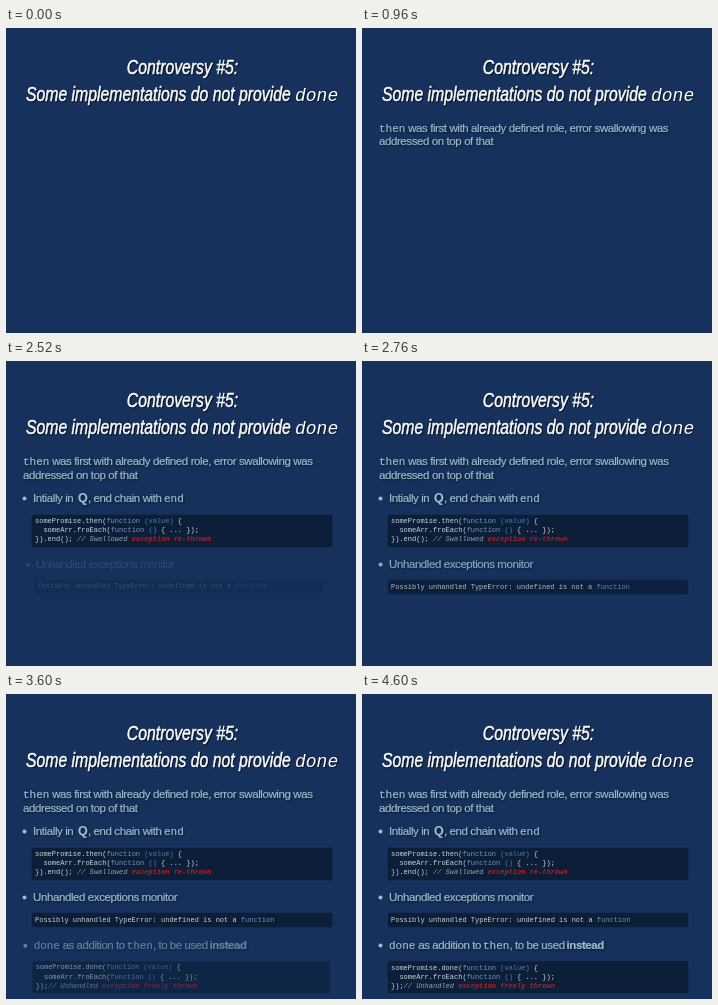
Animation, 350 px wide and 305 px high, one loop 4.64 s. Source, as an HTML page:

```html
<!DOCTYPE html>
<html lang="en">
<head>
<meta charset="utf-8">
<title>Controversy #5</title>
<style>
html, body { margin: 0; width: 100%; height: 100%; overflow: hidden; background: #15315c; }
svg { display: block; }
text { white-space: pre; }
.title { font: italic 20.5px "Liberation Sans", Arial, sans-serif; fill: #fff; stroke: #fff; stroke-width: .5px; filter: drop-shadow(1px 1.5px .7px #0009); }
.title .mono { font: italic 18px "Liberation Mono", monospace; stroke: none; }
.step { font: 11.5px "Liberation Sans", Arial, sans-serif; letter-spacing: -.4px; fill: #9fbbcc; }
.step > text { stroke: #9fbbcc; stroke-width: .2px; filter: drop-shadow(1px 1px 1px #0007); }
.mono { font: 11px "Liberation Mono", monospace; letter-spacing: 0; }
.q { font-size: 12.5px; font-weight: bold; }
.b { font-weight: bold; }
.box { fill: #0c1e38; stroke: #0c1e38; stroke-opacity: .5; }
.step .code { font: 7px "Liberation Mono", monospace; letter-spacing: 0; fill: #cbd6dc; stroke: none; }
.k { fill: #7197bb; }
.v { fill: #4a7fb8; }
.c { fill: #94a3b1; font-style: italic; }
.e { fill: #b5201f; font-weight: bold; font-style: italic; }
</style>
</head>
<body>
<svg width="350" height="305" viewBox="0 0 350 305">
  <g class="title">
    <text transform="translate(176.5 46) scale(.77 1)" text-anchor="middle">Controversy #5:</text>
    <text transform="translate(20 73) scale(.77 1)">Some implementations do not provide</text>
    <text class="mono" x="289" y="73">done</text>
  </g>

  <g class="step" data-begin="560" data-y="107">
    <text x="17" y="104"><tspan class="mono">then</tspan> was first with already defined role, error swallowing was</text>
    <text x="17" y="117.5">addressed on top of that</text>
  </g>

  <g class="step" data-begin="1480" data-y="160">
    <circle cx="18.5" cy="137.5" r="2"/>
    <text x="27" y="141">Intially in <tspan class="q" x="72">Q</tspan><tspan x="82">, end chain with </tspan><tspan class="mono" x="158">end</tspan></text>
    <rect class="box" x="26" y="154" width="300" height="32" rx="1.5"/>
    <g class="code">
      <text x="29" y="162">somePromise.then(<tspan class="k">function</tspan> <tspan class="v">(value)</tspan> {</text>
      <text x="29" y="171">  someArr.froEach(<tspan class="k">function</tspan> <tspan class="v">()</tspan> { ... });</text>
      <text x="29" y="180">}).end(); <tspan class="c">// Swallowed </tspan><tspan class="e">exception re-thrown</tspan></text>
    </g>
  </g>

  <g class="step" data-begin="2480" data-y="215">
    <circle cx="18.5" cy="203.5" r="2"/>
    <text x="27" y="207">Unhandled exceptions monitor</text>
    <rect class="box" x="26" y="219" width="300" height="14" rx="1.5"/>
    <text class="code" x="29" y="228">Possibly unhandled TypeError: undefined is not a <tspan class="k">function</tspan></text>
  </g>

  <g class="step" data-begin="3440" data-y="272">
    <circle cx="18.5" cy="251.5" r="2"/>
    <text x="27" y="255"><tspan class="mono">done</tspan> as addition to <tspan class="mono" x="121">then</tspan>, to be used <tspan class="b" x="204.5">instead</tspan></text>
    <rect class="box" x="26" y="267.5" width="300" height="31.5" rx="1.5"/>
    <g class="code">
      <text x="29" y="275.5">somePromise.done(<tspan class="k">function</tspan> <tspan class="v">(value)</tspan> {</text>
      <text x="29" y="284.7">  someArr.froEach(<tspan class="k">function</tspan> <tspan class="v">()</tspan> { ... });</text>
      <text x="29" y="294">});<tspan class="c">// Unhandled </tspan><tspan class="e">exception freely thrown</tspan></text>
    </g>
  </g>
</svg>
<script>
const LOOP = 4640, TICK = 40, FADE = 450, PIVOT_X = 100;
const steps = [...document.querySelectorAll('.step')];
const start = performance.now();
const easeOut = (p, power) => 1 - (1 - p) ** power;

function draw() {
  const elapsed = Math.max(0, performance.now() - start) % LOOP;
  const time = Math.floor(elapsed / TICK) * TICK;
  for (const step of steps) {
    const { begin, y } = step.dataset;
    const p = Math.min(1, Math.max(0, (time - begin) / FADE));
    const scale = 0.94 + 0.06 * easeOut(p, 4);
    step.setAttribute('opacity', easeOut(p, 2));
    step.setAttribute('transform',
      `translate(${PIVOT_X} ${y}) scale(${scale}) translate(${-PIVOT_X} ${-y})`);
  }
  requestAnimationFrame(draw);
}
draw();
</script>
</body>
</html>
```
